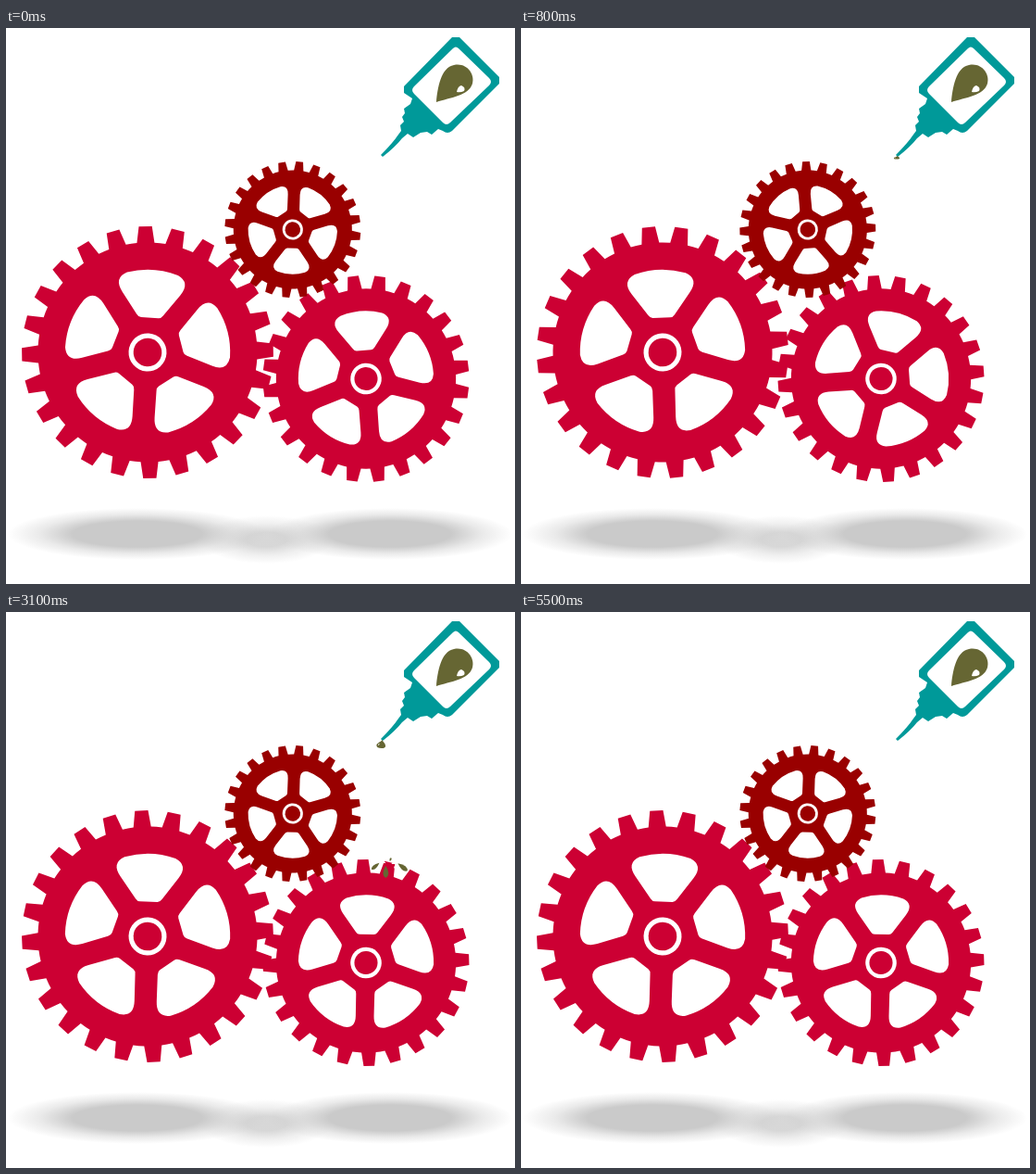
These frames come from a looping animation (550x600 px, 5.78 s). An HTML page with a canvas:

```html
<!DOCTYPE html>
<html lang="en">
<head>
<meta charset="utf-8">
<title>Oiling the gears</title>
<style>
  html, body { margin: 0; width: 100%; height: 100%; overflow: hidden; background: #fff; }
  canvas { display: block; }
</style>
</head>
<body>
<canvas id="stage" width="550" height="600"></canvas>
<script>
const ctx = document.getElementById('stage').getContext('2d');
const LOOP = 5780, STEP = 100, LAST = 55;
const RED = '#cc0033', DARK = '#990000', TEAL = '#009999', OIL = '#666633';
const RAD = Math.PI / 180;

// Angles in degrees; swing holds [step, turn] pairs.
const gears = [
  { x: 153, y: 350, r: 136, color: RED, tooth: -91, hole: -86.4,
    swing: [[0, 0], [2, -5.3], [6, -7.2], [12, -1.8]] },
  { x: 389, y: 378.5, r: 111.5, color: RED, tooth: -97.2, hole: -94.2,
    swing: [[0, 0], [2, 7.6], [6, 24.3], [12, 5.5]] },
  { x: 309.8, y: 217.5, r: 73.5, color: DARK, tooth: -99.2, hole: -52,
    swing: [[0, 0], [2, -8.6], [6, -10.8], [12, 0]] }
];

const drops = [
  { start: 14.8, hang: 404, land: 407, splash: [398, 415, 272, 275] },
  { start: 36, hang: 400, land: 400, splash: [398, 398, 275, 278] }
];

const lerp = (a, b, k) => a + (b - a) * k;
const clamp = v => Math.max(0, Math.min(1, v));

function along(keys, f) {
  for (let i = 1; i < keys.length; i++) {
    const [f0, v0] = keys[i - 1], [f1, v1] = keys[i];
    if (f <= f1) return lerp(v0, v1, (f - f0) / (f1 - f0));
  }
  return keys[keys.length - 1][1];
}

function fill(color, path) {
  ctx.fillStyle = color;
  ctx.fill(typeof path === 'string' ? new Path2D(path) : path);
}

function disc(r, color) {
  const p = new Path2D();
  p.arc(0, 0, r, 0, 2 * Math.PI);
  fill(color, p);
}

function toothedRim() {
  const p = new Path2D(), n = 24, tip = 136, root = 118.5;
  const add = (r, deg) => p.lineTo(r * Math.cos(deg * RAD), r * Math.sin(deg * RAD));
  for (let i = 0; i < n; i++) {
    const a = i * 360 / n;
    add(root, a - 4.6);
    add(tip, a - 3);
    add(tip, a + 3);
    add(root, a + 4.6);
    p.arc(0, 0, root, (a + 4.6) * RAD, (a + 360 / n - 4.6) * RAD);
  }
  p.closePath();
  return p;
}

// One opening between two spokes, centred on the positive x axis.
function opening() {
  const p = new Path2D(), outer = 89.2, half = 12, spoke = 36 * RAD;
  const side = d => [d * Math.cos(spoke) + half * Math.sin(spoke),
                     d * Math.sin(spoke) - half * Math.cos(spoke)];
  const [ix, iy] = side(37.5), [sx, sy] = side(70), [cx, cy] = side(87.5);
  const end = 18 * RAD, ex = outer * Math.cos(end), ey = outer * Math.sin(end);
  p.moveTo(ix, -iy + 3);
  p.quadraticCurveTo(ix, -iy, ix + 3, -iy - 2);
  p.lineTo(sx, -sy);
  p.quadraticCurveTo(cx, -cy, ex, -ey);
  p.arc(0, 0, outer, -end, end);
  p.quadraticCurveTo(cx, cy, sx, sy);
  p.lineTo(ix + 3, iy + 2);
  p.quadraticCurveTo(ix, iy, ix, iy - 3);
  p.closePath();
  return p;
}

const RIM = toothedRim(), HOLE = opening();

function drawGear(g, f) {
  const turn = along(g.swing, f);
  ctx.save();
  ctx.translate(g.x, g.y);
  ctx.scale(g.r / 136, g.r / 136);
  ctx.save();
  ctx.rotate((g.tooth + turn) * RAD);
  fill(g.color, RIM);
  ctx.restore();
  ctx.rotate((g.hole + turn) * RAD);
  for (let i = 0; i < 5; i++) {
    fill('#fff', HOLE);
    ctx.rotate(72 * RAD);
  }
  disc(20.5, '#fff');
  disc(15.3, g.color);
  ctx.restore();
}

function softEllipse(x, y, rx, ry, alpha, core) {
  const g = ctx.createRadialGradient(0, 0, 0, 0, 0, 1);
  const tone = a => `rgba(202,202,202,${a})`;
  g.addColorStop(0, tone(alpha));
  g.addColorStop(core, tone(alpha));
  g.addColorStop(lerp(core, 1, 0.5), tone(alpha * 0.4));
  g.addColorStop(1, tone(0));
  ctx.save();
  ctx.translate(x, y);
  ctx.scale(rx, ry);
  disc(1, g);
  ctx.restore();
}

function drawShadows() {
  softEllipse(281, 552, 72, 26, 0.75, 0.3);
  softEllipse(142, 546, 140, 28, 1, 0.5);
  softEllipse(415, 546, 132, 28, 1, 0.5);
}

function drawBottle() {
  fill(TEAL, 'M482 10H490L533 53V60L482 111Q477 115 472 111L467 109L460 115L455 112L448 113' +
    'L440 118L434 114L428 119Q421 128 407 139L405 137Q418 124 424 115L427 111L426 105L430 101' +
    'L428 96L431 92L430 87L437 82L439 76L430 70V63Z');
  fill('#fff', 'M483 22Q486 19 489 22L522 54Q526 58 522 62L480 102Q476 106 472 102' +
    'L441 71Q437 67 441 63Z');
  fill(OIL, 'M465 80C466 66 470 42 484 40C498 37 507 50 504 60C500 73 480 75 465 80Z');
  fill('#fff', 'M487 69Q488 63 492 62Q497 64 495 68Q491 70 487 69Z');
}

function drawDrop(x, y, sx, sy) {
  ctx.save();
  ctx.translate(x, y);
  ctx.scale(sx, sy);
  fill(OIL, 'M2 0C4 6 8 11 8 17C8 22 5 24 1 24C-5 24 -8 21 -8 16C-8 9 -1 7 2 0Z');
  fill('#fff', 'M-3 10Q-7 13 -5 16Q-2 14 -3 10Z');
  ctx.restore();
}

function leaf(x, y, deg, len, width, color) {
  ctx.save();
  ctx.translate(x, y);
  ctx.rotate(deg * RAD);
  fill(color, `M${-len / 2} 0Q${len / 4} ${-width} ${len / 2} 0Q${len / 4} ${width} ${-len / 2} 0Z`);
  ctx.restore();
}

function drawSplash([x0, x1, y0, y1], k) {
  const s = lerp(0.92, 1.05, k);
  ctx.save();
  ctx.translate(lerp(x0, x1, clamp(k * 1.3)), lerp(y0, y1, k));
  ctx.scale(s, s);
  leaf(-15, 0, 140, 11, 4, OIL);
  leaf(14, 1, 38, 13, 5, OIL);
  leaf(-4, 6, 90, 13, 6, OIL);
  leaf(-8, -5, 205, 9, 3.5, '#fff');
  leaf(6, -4, -25, 9, 3.5, '#fff');
  leaf(1, -7, -70, 4, 2, OIL);
  leaf(7, 3, 50, 8, 3, '#fff');
  ctx.restore();
}

function drawOil(d, f) {
  const u = f - d.start;
  if (u < -7.1 || u > 18.5) return;
  if (u < 0) {
    const s = (u + 8) / 8;
    drawDrop(lerp(406, d.hang, clamp(s * 1.4 - 0.4)), 138, Math.min(1, 0.25 + 0.95 * s), s);
  } else if (u < 10.5) {
    drawDrop(lerp(d.hang, d.land, clamp(u / 6)), 138 + 12 * u, 1, 1);
  } else {
    drawSplash(d.splash, clamp((u - 11) / 7));
  }
}

function render(now) {
  const f = Math.min(LAST, Math.floor(now % LOOP / STEP));
  ctx.fillStyle = '#fff';
  ctx.fillRect(0, 0, 550, 600);
  drawShadows();
  gears.forEach(g => drawGear(g, f));
  drawBottle();
  drops.forEach(d => drawOil(d, f));
}

const begin = performance.now();
function tick() {
  render(performance.now() - begin);
  requestAnimationFrame(tick);
}
tick();
</script>
</body>
</html>
```
